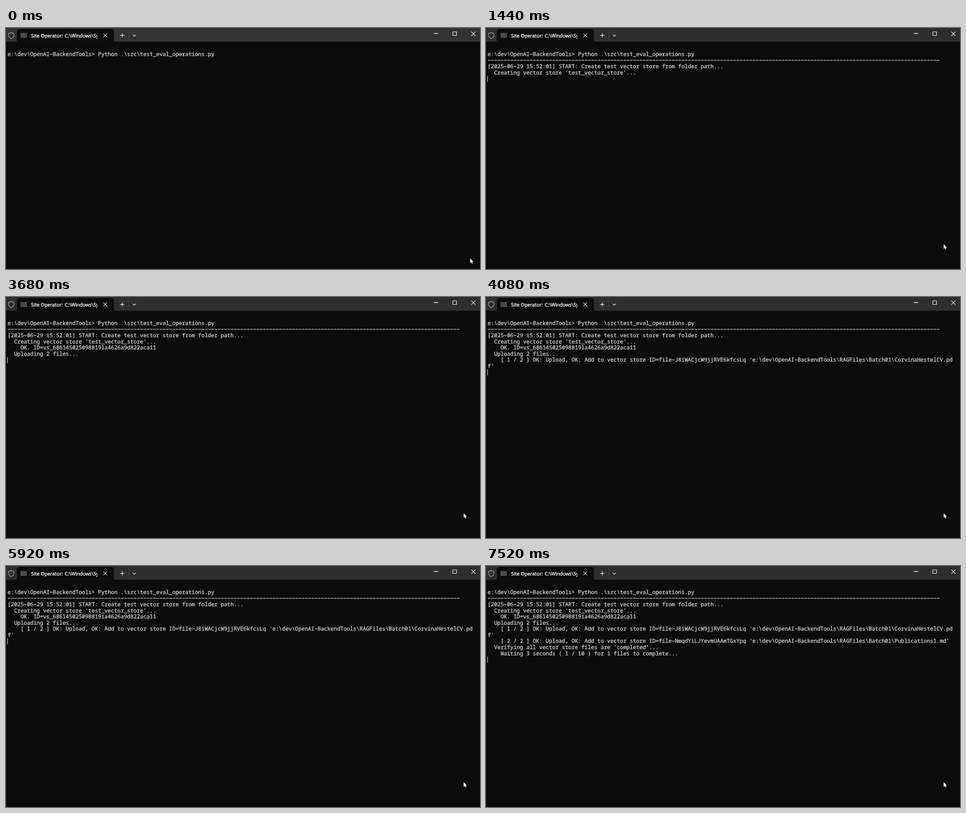
Animation, 1048 px wide and 534 px high, one loop 8000 ms. Source, as an HTML page with a canvas:

```html
<!DOCTYPE html>
<html lang="en">
<head>
<meta charset="utf-8">
<title>Terminal</title>
<style>
  html, body { margin: 0; width: 100%; height: 100%; overflow: hidden; background: #0c0c0c; }
  canvas { display: block; width: 1048px; height: 534px; }
</style>
</head>
<body>
<canvas id="stage" width="1048" height="534"></canvas>
<script>
const ctx = document.getElementById('stage').getContext('2d');
const LOOP = 8000;
const LEFT = 3.6, TOP = 51.8, COL = 7.14, ROW = 13.55;
const BACK = '#0c0c0c', TEXT = '#cccccc', WHITE = '#ffffff';
const MONO = '11.9px "Noto Sans Mono", "DejaVu Sans Mono", monospace';
const SANS = '10.8px "Open Sans", "Noto Sans", sans-serif';

const folder = "'e:\\dev\\OpenAI-BackendTools\\RAGFiles\\Batch01\\";
const upload = (n, id, file) =>
  `    [ ${n} / 2 ] OK: Upload, OK: Add to vector store ID=file-${id} ${folder}${file}'`;

const output = [
  { time: 0, lines: ['e:\\dev\\OpenAI-BackendTools> Python .\\src\\test_eval_operations.py'] },
  { time: 800, lines: [
    '-'.repeat(140),
    '[2025-06-29 15:52:01] START: Create test vector store from folder path...',
    "  Creating vector store 'test_vector_store'..."
  ] },
  { time: 2040, lines: [
    '    OK. ID=vs_6861450250988191a4626a9d822aca11',
    '  Uploading 2 files...'
  ] },
  { time: 4080, lines: [upload(1, 'J8iWACjcW9jjRVE6kfcsLq', 'CorvinaHestelCV.pdf')] },
  { time: 6520, lines: [
    upload(2, 'NmqdYiLJYevmUAAmTGxYpq', 'Publications1.md'),
    "  Verifying all vector store files are 'completed'..."
  ] },
  { time: 6720, lines: ['    Waiting 3 seconds ( 1 / 10 ) for 1 files to complete...'] }
];

// The caret flips at each of these times; it is hidden at first.
const flips = [400, 600, 800, 1040, 1440, 2040, 2640, 3080, 3680, 4280, 4720, 5320, 5920, 6920, 7520];

// Lines printed so far, wrapped at the window width.
const printed = t => output
  .filter(step => step.time <= t)
  .flatMap(step => step.lines)
  .flatMap(text => text.match(/.{1,144}/g));

function line(color, width, ...points) {
  ctx.beginPath();
  points.forEach(([x, y]) => ctx.lineTo(x, y));
  ctx.strokeStyle = color;
  ctx.lineWidth = width;
  ctx.stroke();
}

function cross(x, y, r, width) {
  line(WHITE, width, [x - r, y - r], [x + r, y + r]);
  line(WHITE, width, [x + r, y - r], [x - r, y + r]);
}

// Filled text with a hairline outline, for a medium weight.
function write(text, x, y, font, color, outline) {
  ctx.font = font;
  ctx.fillStyle = ctx.strokeStyle = color;
  ctx.lineWidth = outline;
  ctx.lineJoin = 'round';
  ctx.fillText(text, x, y);
  ctx.strokeText(text, x, y);
}

function drawShield() {
  ctx.strokeStyle = '#b4b4b4';
  ctx.lineWidth = 1.1;
  ctx.stroke(new Path2D(
    'M11.5 9.8Q14 11.8 17.5 12V16Q17.3 21 11.5 23.4Q5.7 21 5.5 16V12Q9 11.8 11.5 9.8Z'));
}

function drawTab() {
  ctx.fillStyle = BACK;
  ctx.fill(new Path2D(
    'M20 30.5Q24 30.5 24 26.5V9Q24 2 31 2H231.5Q238.5 2 238.5 9V26.5Q238.5 30.5 242.5 30.5Z'));
  ctx.fillStyle = '#4a4a4a';
  ctx.fillRect(32, 11, 14, 11);

  ctx.save();
  ctx.beginPath();
  ctx.rect(50, 4, 152, 24);
  ctx.clip();
  write('Site Operator:', 55.5, 20.6, SANS, WHITE, 0.4);
  write('C:\\Windows\\System32', 129.8, 20.6, SANS, WHITE, 0.4);
  ctx.restore();
  cross(219.5, 16.3, 3.9, 1.1);
}

function drawBar(t) {
  ctx.fillStyle = t < 400 ? '#333333' : '#2e2e2e';
  ctx.fillRect(0, 0, 1048, 30.5);
  drawShield();
  drawTab();
  line(WHITE, 1.2, [252.5, 16.5], [261.5, 16.5]);
  line(WHITE, 1.2, [257, 12], [257, 21]);
  line('#414141', 1, [271.5, 6], [271.5, 27]);
  line(WHITE, 1.2, [280.2, 14.8], [283.8, 18.4], [287.4, 14.8]);
  line(WHITE, 1.5, [946, 12.3], [955.5, 12.3]);
  ctx.lineWidth = 1.2;
  ctx.strokeRect(988, 8.5, 8, 8);
  cross(1033.4, 12.6, 4.5, 1.2);
}

function drawLine(text, row) {
  const base = TOP + row * ROW + 10.2;
  [...text].forEach((ch, i) => {
    const x = LEFT + i * COL;
    if (ch === ' ') return;
    if (ch !== '-') return write(ch, x, base, MONO, TEXT, 0.4);
    // hyphens are nearly as wide as their cell
    ctx.fillStyle = TEXT;
    ctx.fillRect(x + 0.6, base - 4.7, 5.9, 1.4);
  });
}

function drawCaret(lines) {
  const waiting = lines.length === 1;
  const x = waiting ? LEFT + lines[0].length * COL : LEFT;
  const row = waiting ? 0 : lines.length;
  ctx.fillStyle = '#e0e0e0';
  ctx.fillRect(Math.floor(x), TOP + row * ROW, 1, 13.4);
}

function drawPointer(t) {
  // closes in on its resting place in steps
  const gap = 0.05 ** Math.floor(t / 200);
  ctx.save();
  ctx.translate(1011.9 + 14.3 * gap, 479 + 31.5 * gap);
  const arrow = new Path2D('M0 0V10.4L2.3 8.3L4 11.9L5.6 11.2L4 7.7L7.2 7.5Z');
  ctx.strokeStyle = '#000000';
  ctx.lineWidth = 1;
  ctx.stroke(arrow);
  ctx.fillStyle = WHITE;
  ctx.fill(arrow);
  ctx.restore();
}

function draw(t) {
  ctx.textRendering = 'geometricPrecision';
  ctx.fillStyle = BACK;
  ctx.fillRect(0, 0, 1048, 534);
  drawBar(t);
  const lines = printed(t);
  lines.forEach(drawLine);
  if (flips.filter(time => time <= t).length % 2) drawCaret(lines);
  drawPointer(t);
}

const start = performance.now();
function tick() {
  draw((performance.now() - start) % LOOP);
  requestAnimationFrame(tick);
}
tick();
</script>
</body>
</html>
```
